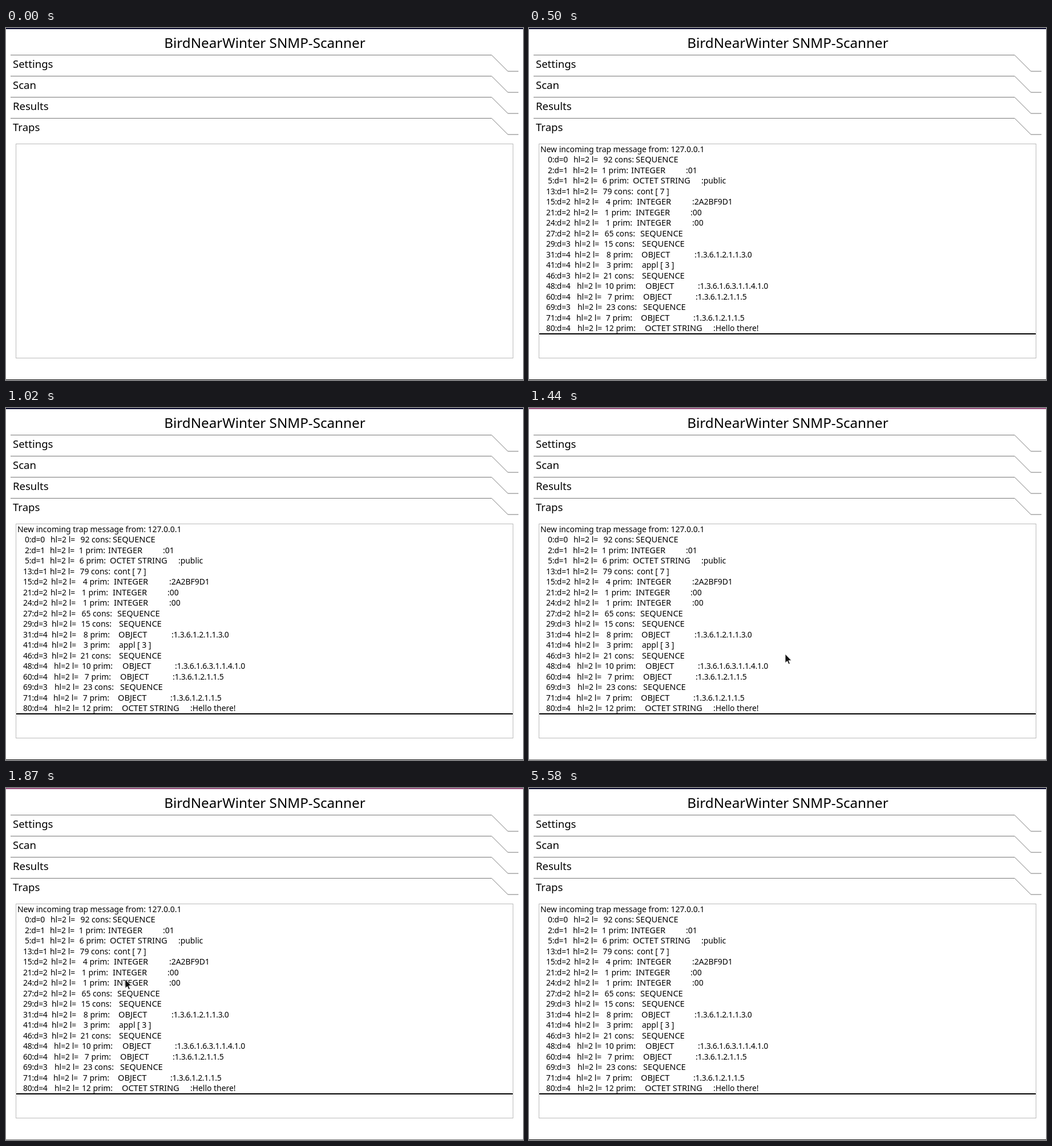
Animation of 906x618 px, one loop 8000 ms. Source, as an HTML page:

```html
<!DOCTYPE html>
<html lang="en">
<head>
<meta charset="utf-8">
<title>SNMP scanner</title>
<style>
  html, body { margin: 0; width: 100%; height: 100%; overflow: hidden; background: #fff; }
  svg { display: block; }
  text { font: 13.9px "Noto Sans", sans-serif; fill: #000; }
  .title { font-size: 24.2px; text-anchor: middle; }
  .tab { font-size: 18.5px; }
  .caps { font-size: 14.6px; }
  .end { text-anchor: end; }
  .digits { letter-spacing: -.25px; }
  .line { fill: none; stroke: #777; }
</style>
</head>
<body>
<svg width="906" height="618" viewBox="0 0 906 618">
  <rect id="top" width="906" height="2"/>
  <rect id="bottom" y="617" width="906" height="1"/>
  <text class="title" x="453.5" y="35">BirdNearWinter SNMP-Scanner</text>
  <g id="tabs"></g>
  <rect x="17.5" y="203.5" width="871" height="376" fill="none" stroke="#bbb"/>
  <g id="message"></g>
  <path id="cursor" d="M0 0V15.5L3.6 12.2L6 17.8L8.3 16.8L6 11.3H10.8Z" fill="#111" stroke="#fff" stroke-width=".8"/>
</svg>
<script>
const LOOP = 8000;
const TRAP_AT = 500;
const FOCUS = { from: 1370, to: 1940 };
const POINTS = [[1370, 198.5, 317], [1440, 449, 432], [1870, 209, 336]];

// id x, id, header x, length and kind, its right edge, tag, tag x, value, value x
const ROWS = [
  [33, "0:d=0", 77, "92 cons:", 184, "SEQUENCE", 187],
  [33, "2:d=1", 76, "1 prim:", 174, "INTEGER", 179, ":01", 275],
  [33, "5:d=1", 76, "6 prim:", 175, "OCTET STRING", 182, ":public", 302],
  [30, "13:d=1", 76, "79 cons:", 183, "cont [ 7 ]", 189],
  [30, "15:d=2", 78, "4 prim:", 181, "INTEGER", 189, ":2A2BF9D1", 286],
  [30, "21:d=2", 77, "1 prim:", 179, "INTEGER", 187, ":00", 283],
  [30, "24:d=2", 78, "1 prim:", 181, "INTEGER", 189, ":00", 286],
  [30, "27:d=2", 78, "65 cons:", 186, "SEQUENCE", 195],
  [30, "29:d=3", 79, "15 cons:", 185, "SEQUENCE", 198],
  [30, "31:d=4", 79, "8 prim:", 182, "OBJECT", 197, ":1.3.6.1.2.1.1.3.0", 290],
  [30, "41:d=4", 79, "3 prim:", 182, "appl [ 3 ]", 198],
  [30, "46:d=3", 79, "21 cons:", 184, "SEQUENCE", 198],
  [30, "48:d=4", 83, "10 prim:", 187, "OBJECT", 204, ":1.3.6.1.6.3.1.1.4.1.0", 296],
  [30, "60:d=4", 83, "7 prim:", 184, "OBJECT", 200, ":1.3.6.1.2.1.1.5", 292],
  [30, "69:d=3", 84, "23 cons:", 189, "SEQUENCE", 200],
  [30, "71:d=4", 82, "7 prim:", 181, "OBJECT", 196, ":1.3.6.1.2.1.1.5", 288],
  [30, "80:d=4", 84, "12 prim:", 187, "OCTET STRING", 203, ":Hello there!", 323],
];

const el = id => document.getElementById(id);
const text = (x, y, str, cls = "") => `<text class="${cls}" x="${x}" y="${y}">${str}</text>`;
const show = (node, on) => node.setAttribute("visibility", on ? "visible" : "hidden");

el("tabs").innerHTML = ["Settings", "Scan", "Results", "Traps"].map((name, i) => {
  const y = 47.5 + 37 * i;
  return `<path class="line" d="M8 ${y}H851L879.5 ${y + 28.5}H898"/>` + text(12, y + 22, name, "tab");
}).join("");

const rowY = i => 218 + 18.47 * i;
el("message").innerHTML =
  text(20, rowY(0), "New incoming trap message from: 127.0.0.1") +
  ROWS.map(([idX, id, headX, field, end, tag, tagX, value, valueX], i) => {
    const y = rowY(i + 1);
    return text(idX, y, id, "digits") + text(headX + 1, y, "hl=2 l=") + text(end, y, field, "end") +
      text(tagX, y, tag, /[a-z]/.test(tag) ? "" : "caps") +
      (value ? text(valueX, y, value, value.startsWith(":1.") ? "digits" : "") : "");
  }).join("") +
  '<rect x="18" y="536" width="870" height="2"/>';

function draw(now) {
  const t = now % LOOP;
  const focused = t >= FOCUS.from && t < FOCUS.to;
  show(el("message"), t >= TRAP_AT);
  show(el("cursor"), focused);
  el("top").setAttribute("fill", focused ? "#9b4f80" : "#0a0a2c");
  el("bottom").setAttribute("fill", focused ? "#777" : "#111");
  if (focused) {
    const [, x, y] = POINTS.findLast(p => p[0] <= t);
    el("cursor").setAttribute("transform", `translate(${x} ${y})`);
  }
}

const start = performance.now();
function tick() {
  draw(performance.now() - start);
  requestAnimationFrame(tick);
}
tick();
</script>
</body>
</html>
```
